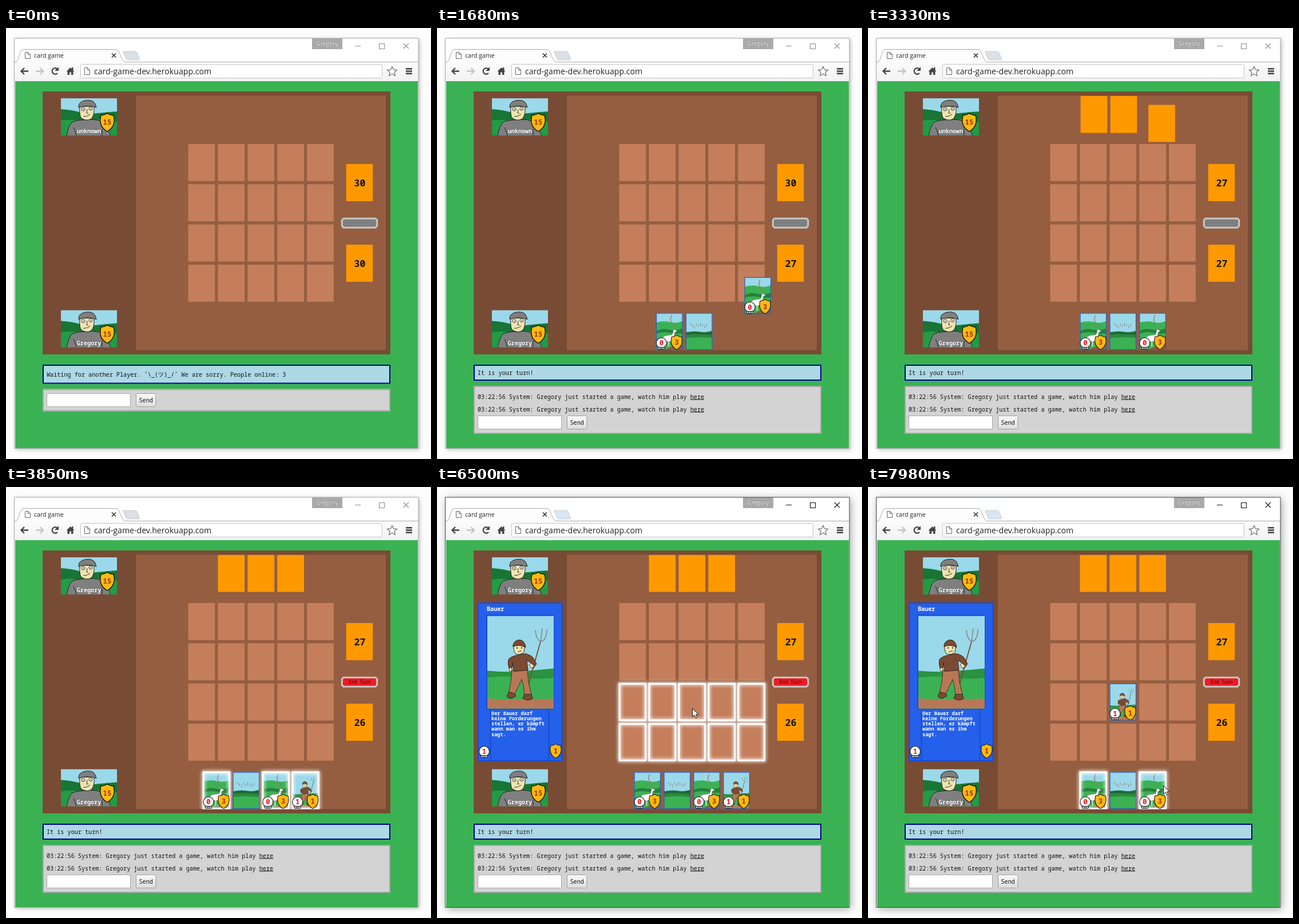
Animation of 743x754 px, one loop 8000 ms. Source, as an HTML page with a canvas:

```html
<!DOCTYPE html>
<html lang="en">
<head>
<meta charset="utf-8">
<title>card game</title>
<style>
  html, body { margin: 0; width: 100%; height: 100%; overflow: hidden; background: #fdfdfd; }
  canvas { display: block; }
</style>
</head>
<body>
<canvas id="stage" width="743" height="754"></canvas>
<script>
const ctx = document.getElementById('stage').getContext('2d');
const LOOP = 8000;
const MONO = '"Noto Sans Mono", "DejaVu Sans Mono", monospace';
const SANS = '"Open Sans", "Noto Sans", sans-serif';
const USER = 'Gregory';
const CARD_W = 46.7, CARD_H = 64.8, PITCH = 51.9;
const SKY = '#9ad9ea', GREEN = '#3ab254', DARK = '#187534', SKIN = '#efe4b0';

const clamp = v => Math.max(0, Math.min(1, v));
const lerp = (a, b, f) => a + (b - a) * f;

// Piecewise linear track: rows of [time, ...values].
function track(rows, t) {
  let i = 1;
  while (i < rows.length - 1 && rows[i][0] < t) i++;
  const a = rows[i - 1], b = rows[i], f = clamp((t - a[0]) / (b[0] - a[0]));
  return a.slice(1).map((v, k) => lerp(v, b[k + 1], f));
}

function rect(x, y, w, h, fill) {
  ctx.fillStyle = fill;
  ctx.fillRect(x, y, w, h);
}

function frame(x, y, w, h, color, line, fill) {
  if (fill) rect(x, y, w, h, fill);
  ctx.strokeStyle = color;
  ctx.lineWidth = line;
  ctx.strokeRect(x + line / 2, y + line / 2, w - line, h - line);
}

function shape(d, fill, stroke, line = 1) {
  const path = new Path2D(d);
  if (fill) { ctx.fillStyle = fill; ctx.fill(path); }
  if (stroke) { ctx.strokeStyle = stroke; ctx.lineWidth = line; ctx.stroke(path); }
}

function round(x, y, w, h, r, fill, stroke, line = 1) {
  ctx.beginPath();
  ctx.roundRect(x, y, w, h, r);
  if (fill) { ctx.fillStyle = fill; ctx.fill(); }
  if (stroke) { ctx.strokeStyle = stroke; ctx.lineWidth = line; ctx.stroke(); }
}

function text(s, x, y, size, color, { font = MONO, bold = false, align = 'left', edge } = {}) {
  ctx.font = `${bold ? 'bold ' : ''}${size}px ${font}`;
  ctx.textAlign = align;
  if (edge) {
    ctx.strokeStyle = edge;
    ctx.lineWidth = 1.4;
    ctx.lineJoin = 'round';
    ctx.strokeText(s, x, y);
    ctx.lineJoin = 'miter';
  }
  ctx.fillStyle = color;
  ctx.fillText(s, x, y);
}

function at(x, y, draw, scale = 1) {
  ctx.save();
  ctx.translate(x, y);
  ctx.scale(scale, scale);
  draw();
  ctx.restore();
}

function clipped(x, y, w, h, draw) {
  ctx.save();
  ctx.beginPath();
  ctx.rect(x, y, w, h);
  ctx.clip();
  draw();
  ctx.restore();
}

// ---- browser window ----

function pageIcon(x, y, w, h) {
  shape(`M${x} ${y}h${w - 4}l4 4v${h - 4}h${-w}ZM${x + w - 4} ${y}v4h4`, '#fff', '#666');
}

function browser(active) {
  rect(0, 0, 743, 754, '#fdfdfd');
  ctx.save();
  ctx.shadowColor = active ? 'rgba(0,0,0,.36)' : 'rgba(0,0,0,.3)';
  ctx.shadowBlur = active ? 14 : 7;
  ctx.shadowOffsetX = 1.5;
  ctx.shadowOffsetY = active ? 3 : 2;
  rect(15, 18, 706, 717, '#fff');
  ctx.restore();

  const ink = active ? '#111' : '#8c8c8c';
  const bar = ctx.createLinearGradient(0, 59, 0, 93);
  bar.addColorStop(0, '#fcfcfc');
  bar.addColorStop(1, '#f2f2f2');
  rect(15, 59, 706, 34, bar);
  shape('M15 59.5H18C22 58 24 38 30 37.5H193C199 38 201 58 208 59.5H721', '#fdfdfd', '#aaa');
  rect(19, 59, 187, 1.5, '#fcfcfc');
  shape('M205 42Q204 41 207 41H225Q228 41 229 43L233 53Q234 56 231 56H214Q211 56 210 54Z',
    active ? '#d9e5f3' : '#dbe0e6', '#c5cbd2');
  pageIcon(33.5, 42.5, 9, 11);
  text('card game', 49, 52, 10.6, '#222', { font: SANS });
  shape('M185 44.5l7 7m0 -7l-7 7', null, '#333', 1.6);

  rect(535, 18, 53, 19, '#aaa');
  text(USER, 561.5, 31, 10, '#fff', { font: SANS, align: 'center', edge: '#888' });
  shape('M610 31.5h10M652.5 27.5h9v9h-9ZM695 27l9 9m0 -9l-9 9', null, ink, 1.1);

  shape('M39 75.5H27M32 70l-5.5 5.5l5.5 5.5', null, '#444', 2.4);
  shape('M52 75.5H64M59.5 70l5.5 5.5l-5.5 5.5', null, '#c4c4c4', 2.4);
  shape('M90 79A5.3 5.3 0 1 1 89.5 71.5', null, '#444', 2.3);
  shape('M92 68v7h-7Z', '#444');
  shape('M105.5 76L112.5 69L115 71.5V69H117.5V74L119.5 76H117.5V82H114V77.5H111V82H107.5V76Z', '#444');
  round(130.5, 63.5, 527, 24, 2, '#fff', '#c4c4c4');
  pageIcon(137.5, 69.5, 9, 12);
  text('card-game-dev.herokuapp.com', 154, 81, 14.15, '#222', { font: SANS });
  shape('M675 67.5l2.4 5.5 6 .5-4.5 4 1.4 6-5.3-3.2-5.3 3.2 1.4-6-4.5-4 6-.5Z', '#fff', '#777', 1.3);
  for (let i = 0; i < 3; i++) rect(699, 70 + 4.2 * i, 11, 2.6, '#444');

  rect(16, 93, 704, 642, GREEN);
  frame(14, 17.5, 707.5, 718.5, active ? '#3c4a42' : '#a5aaa7', 1);
}

// ---- status and chat ----

function sendRow(y) {
  frame(71, y, 147, 24, '#a9a9a9', 1, '#fff');
  const g = ctx.createLinearGradient(0, y, 0, y + 24);
  g.addColorStop(0, '#fafafa');
  g.addColorStop(1, '#dcdcdc');
  round(227.5, y + .5, 34.5, 23, 1.5, g, '#a0a0a0');
  text('Send', 232.5, y + 15.5, 10.17, '#111');
}

function chat(playing) {
  const size = 10.17;
  frame(64, 589, 608, playing ? 28 : 33.5, '#00008b', 2, '#add8e6');
  if (!playing) {
    text('Waiting for another Player. ¯\\_(ツ)_/¯ We are sorry. People online: 3', 71, 609.5, size, '#111');
    frame(64, 631.5, 608, 39, '#a9a9a9', 2, '#d3d3d3');
    sendRow(639);
    return;
  }
  text('It is your turn!', 71, 606.5, size, '#111');
  frame(64, 626, 608, 84, '#a9a9a9', 2, '#d3d3d3');
  for (const y of [648.5, 670.5]) {
    const line = `03:22:56 System: ${USER} just started a game, watch him play `;
    text(line, 71, y, size, '#111');
    const x = 71 + ctx.measureText(line).width;
    text('here', x, y, size, '#111');
    rect(x, y + 1, 24.4, 1, '#111');
  }
  sendRow(678);
}

// ---- pieces ----

const SHIELD = 'M0 -13Q4 -10 9 -10Q13 6 0 13Q-13 6 -9 -10Q-4 -10 0 -13Z';

function shield(x, y, n, scale = 1) {
  at(x, y, () => shape(SHIELD, '#ffb90f', '#111', 1.1), scale);
  text(n, x, y + 4.4, 12.4, '#a0340c', { bold: true, align: 'center' });
}

function skull(x, y, n) {
  at(x, y, () => {
    shape('M-5.5 5V11H5.5V5', '#fff', '#111');
    shape('M-9 0A9 9 0 1 1 9 0Q9 6 4 7.5H-4Q-9 6 -9 0Z', '#fff', '#111', 1.1);
    shape('M-2.5 7V11M0 7V11M2.5 7V11', null, '#111');
  });
  text(n, x, y + 4.4, 12.4, '#f01820', { bold: true, align: 'center' });
}

function avatar(y, name) {
  at(96, y, () => clipped(0, 0, 98, 65, () => {
    rect(0, 0, 98, 65, SKY);
    shape('M0 19Q18 20 32 24T64 26T98 23V65H0Z', DARK);
    shape('M0 39Q14 36 30 39T64 37Q82 37 98 41V65H0Z', '#219c45');
    shape('M10 66Q13 49 19 42Q27 38 36 38L54 37Q70 37 78 46Q84 54 87 66Z', '#7f7f7f', '#222');
    shape('M27 65Q25 56 22 51M72 65V54', null, '#222');
    shape('M33 14Q32 28 35 34Q44 41 53 36Q59 30 58 14Z', SKIN, '#222');
    shape('M31 16Q30 7 41 4Q56 1 60 10L62 16Q46 11 31 16Z', '#7f7f7f', '#222');
    shape('M36 19a3 3 0 1 0 6 0a3 3 0 1 0 -6 0M49 18a3 3 0 1 0 6 0a3 3 0 1 0 -6 0', '#fff', '#333');
    shape('M46 19L45 26H48M39 32Q46 32 51 28', null, '#333');
    rect(38.5, 18.5, 1.5, 1.5, '#222');
    rect(51.5, 17.5, 1.5, 1.5, '#222');
    shield(81, 42, '15', 1.23);
    text(name, 49, 61.3, 10.1, '#fff', { bold: true, align: 'center', edge: '#666' });
  }));
}

// Farmer scene, 117 by 163.
function farmerArt() {
  rect(0, 0, 117, 163, SKY);
  shape('M0 96Q30 99 58 97T117 92V163H0Z', '#2b9242');
  shape('M0 108Q30 104 58 108T117 108V163H0Z', GREEN);
  shape('M0 144Q24 147 46 146T117 145V163H0Z', '#b87858');
  shape('M66 145L76 105L93 45', null, '#7b4a33', 1.8);
  shape('M84 25Q85 40 93 45Q104 43 104 23M96 22L93 45', null, '#8b8d94', 1.8);
  shape('M43 95L41 116L37 135L47 138L54 124L60 111L63 122L65 139L77 137L72 116L70 95Z', '#b87858', '#4b2c1e');
  shape('M38 133L34 140Q36 145 43 144L50 140L48 136ZM65 137L62 144Q69 150 79 145L77 137Z', '#7b4a33', '#3a2418');
  shape('M56 68Q42 70 37 76Q35 83 38 92L43 91L44 81L46 97L71 95L69 78L78 83L75 88L80 92L86 84L80 73Q74 67 65 66Z', '#7b4a33', '#3a2418');
  shape('M38 91L43 91L42 97L39 97Z', SKIN, '#3a2418', .7);
  shape('M73 85L77 83L82 88L77 92Z', SKIN, '#3a2418', .7);
  shape('M46 51Q45 60 49 66Q57 70 64 63L66 50Z', SKIN, '#3a2418');
  shape('M45 54Q44 45 54 42Q65 41 67 55Q55 49 45 54Z', '#7b4a33', '#3a2418');
  rect(51, 55, 2, 2, '#222');
  rect(59, 55, 2, 2, '#222');
  shape('M53 63L60 61', null, '#333');
}

function gooseArt() {
  rect(0, 0, 47, 65, SKY);
  shape('M0 17Q12 13 24 16T47 14V65H0Z', GREEN);
  shape('M0 32Q10 26 22 29T47 27V65H0Z', '#27803a');
  shape('M0 36Q12 32 26 35T47 35V65H0Z', GREEN);
  shape('M16 65Q28 55 47 57V65Z', '#8e5d43');
  shape('M27 4L25 12L29 20L27 28', null, '#a5795e', 1.3);
  shape('M11 46Q12 39 21 39L28 38L30 33Q29 29 33 29L37 32L33 34L31 45Q27 52 18 50Z', '#fff', '#666', .7);
  shape('M22 50V59M27 48L29 57', null, '#f0f0f0', 1.4);
}

function grassArt() {
  rect(0, 0, 47, 65, SKY);
  shape('M0 34Q14 31 25 33T47 31V65H0Z', '#1f6b34');
  shape('M0 38Q20 36 47 39V65H0Z', '#2b8a40');
  shape('M0 44Q22 41 47 44V65H0Z', GREEN);
  for (let i = 0; i < 9; i++) {
    const x = 8 + i * 3.6, y = 18 + (i * 7) % 5;
    shape(`M${x} ${y}v${3 + i % 3}`, null, i % 2 ? '#9a6f68' : '#7f8b91');
  }
}

const KINDS = {
  goose: { art: gooseArt, stats: ['0', '3'] },
  grass: { art: grassArt },
  farmer: { art: () => at(0, 0, farmerArt, .4), stats: ['1', '1'] }
};

function glow(x, y) {
  ctx.save();
  ctx.shadowColor = '#fff';
  ctx.shadowBlur = 6;
  ctx.strokeStyle = 'rgba(255,255,255,.85)';
  ctx.lineWidth = 3;
  for (let i = 0; i < 2; i++) ctx.strokeRect(x + .5, y + .5, CARD_W - 1, CARD_H - 1);
  ctx.restore();
}

function card({ kind, x, y, lit }) {
  if (kind === 'back') return rect(x, y, CARD_W, CARD_H, '#ff9900');
  const { art, stats } = KINDS[kind];
  at(x, y, () => {
    clipped(0, 0, CARD_W, CARD_H, art);
    frame(0, 0, CARD_W, CARD_H, '#2c56c4', 1.2);
  });
  if (lit) glow(x, y);
  if (stats) {
    skull(x + 9.5, y + 52.5, stats[0]);
    shield(x + 36, y + 51.5, stats[1], .97);
  }
}

function bigCard() {
  frame(71, 202, 148.5, 278, '#1a4cd0', 2, '#2560ea');
  text('Bauer', 87, 216.5, 10.17, '#fff', { bold: true });
  frame(86, 223.5, 119, 166, '#1a4cd0', 2);
  at(88, 225.5, () => clipped(0, 0, 116, 162, farmerArt));
  shape('M93.5 390V478M195.5 390V478', null, '#1a4cd0', 2);
  ['Der Bauer darf', 'keine Forderungen', 'stellen, er kämpft', 'wann man es ihm', 'sagt.']
    .forEach((s, i) => text(s, 95, 398.5 + 9.25 * i, 8.6, '#fff', { bold: true }));
  skull(82.5, 462.5, '1');
  shield(207.5, 462, '1', .97);
}

function endButton(on) {
  shape('M590 333.3H646L648.700 336V346L646 349.200H590L587.300 346V336Z', on ? '#ee1c24' : '#7f7f7f', '#c8c8c8', 3);
  if (on) text('End Turn', 618.3, 344, 8, '#3a0508', { align: 'center' });
}

function pointer(x, y) {
  at(x, y, () => shape('M.5 .5V15L4 11.8L6.3 17L8.8 16L6.5 11H11Z', '#fff', '#111'));
}

// ---- timeline ----

const DECK_X = 594.8;
const slot = (i, count) => 422.4 + PITCH * (i - (count - 1) / 2);

// Whole part: number of finished draws, fraction: progress of the current one.
const DRAWS = [[500, 0], [1070, 1.23], [2120, 3.37], [2310, 3.8], [2940, 5.18], [3330, 5.866], [3740, 6.79], [3850, 7]];
const MINE = [0, 1, 2, 6], THEIRS = [3, 4, 5];
const MY_KINDS = ['goose', 'grass', 'goose', 'farmer'];

const READY = 3850, HOVER = 5290, FOCUS = 5540, PICK = 5690, DROP = 6780, FLIGHT = 524;
const POINTER = [
  [4765, 743, 478], [4980, 660, 518], [5150, 595, 523], [5320, 540, 508], [5910, 540, 508],
  [6140, 500, 452], [6350, 447, 388], [6480, 447, 388], [6500, 446, 387], [7360, 446, 387],
  [7570, 472, 408], [7850, 535, 514], [7980, 516, 522]
];

function hand(order, p, fromY, toY, kinds) {
  const n = order.filter(d => p >= d).length;
  const f = clamp(p - order[n - 1]), shift = clamp(f * 1.1);
  return Array.from({ length: n }, (_, i) => i === n - 1
    ? { kind: kinds[i], x: lerp(DECK_X, slot(i, n), f), y: lerp(fromY, toY, f) }
    : { kind: kinds[i], x: lerp(slot(i, n - 1), slot(i, n), shift), y: toY });
}

function deck(y, n) {
  rect(DECK_X, y, 46.4, 65, '#ff9900');
  text(String(n), 618.4, y + 38.5, 16.6, '#111', { bold: true, align: 'center' });
}

function render(t) {
  const playing = t >= 500;
  const p = playing ? track(DRAWS, t)[0] : -1;
  const ready = t >= READY;
  const drawn = order => order.filter(d => p >= d).length;

  browser(t >= FOCUS);
  rect(64, 111, 608, 460, '#784b34');
  rect(227, 118.5, 437, 445, '#955e40');
  avatar(123, ready ? USER : 'unknown');
  avatar(493.5, USER);

  const picking = t >= PICK && t < DROP;
  for (let r = 0; r < 4; r++) {
    for (let c = 0; c < 5; c++) rect(318.6 + PITCH * c, 203 + 70.35 * r, CARD_W, CARD_H, '#c47e5c');
  }
  if (picking) {
    for (let k = 0; k < 10; k++) glow(318.6 + PITCH * (k % 5), 203 + 70.35 * (k < 5 ? 2 : 3));
  }

  deck(238, 30 - drawn(THEIRS));
  deck(379, 30 - drawn(MINE));
  endButton(ready);

  const theirs = hand(THEIRS, p, 238, 118.8, ['back', 'back', 'back']);
  const mine = hand(MINE, p, 379, 498.5, MY_KINDS);
  const q = clamp((t - DROP) / FLIGHT);
  if (t >= DROP) {
    mine.forEach((c, i) => {
      c.x = i < 3 ? lerp(slot(i, 4), slot(i, 3), clamp(q * 1.1)) : lerp(slot(3, 4), 422.4, q);
    });
    mine[3].y = lerp(498.5, 343.7, q);
  }
  const lit = (ready && t < PICK) || q === 1;
  mine.forEach((c, i) => { c.lit = lit && c.kind !== 'grass' && (i < 3 || q === 0); });

  clipped(227, 118.5, 437, 445, () => [...theirs, ...mine].forEach(card));
  if (t >= HOVER) bigCard();
  chat(playing);
  if (t >= POINTER[0][0]) pointer(...track(POINTER, t).map(Math.round));
}

const start = performance.now();
function tick() {
  render((performance.now() - start) % LOOP);
  requestAnimationFrame(tick);
}
tick();
</script>
</body>
</html>
```
